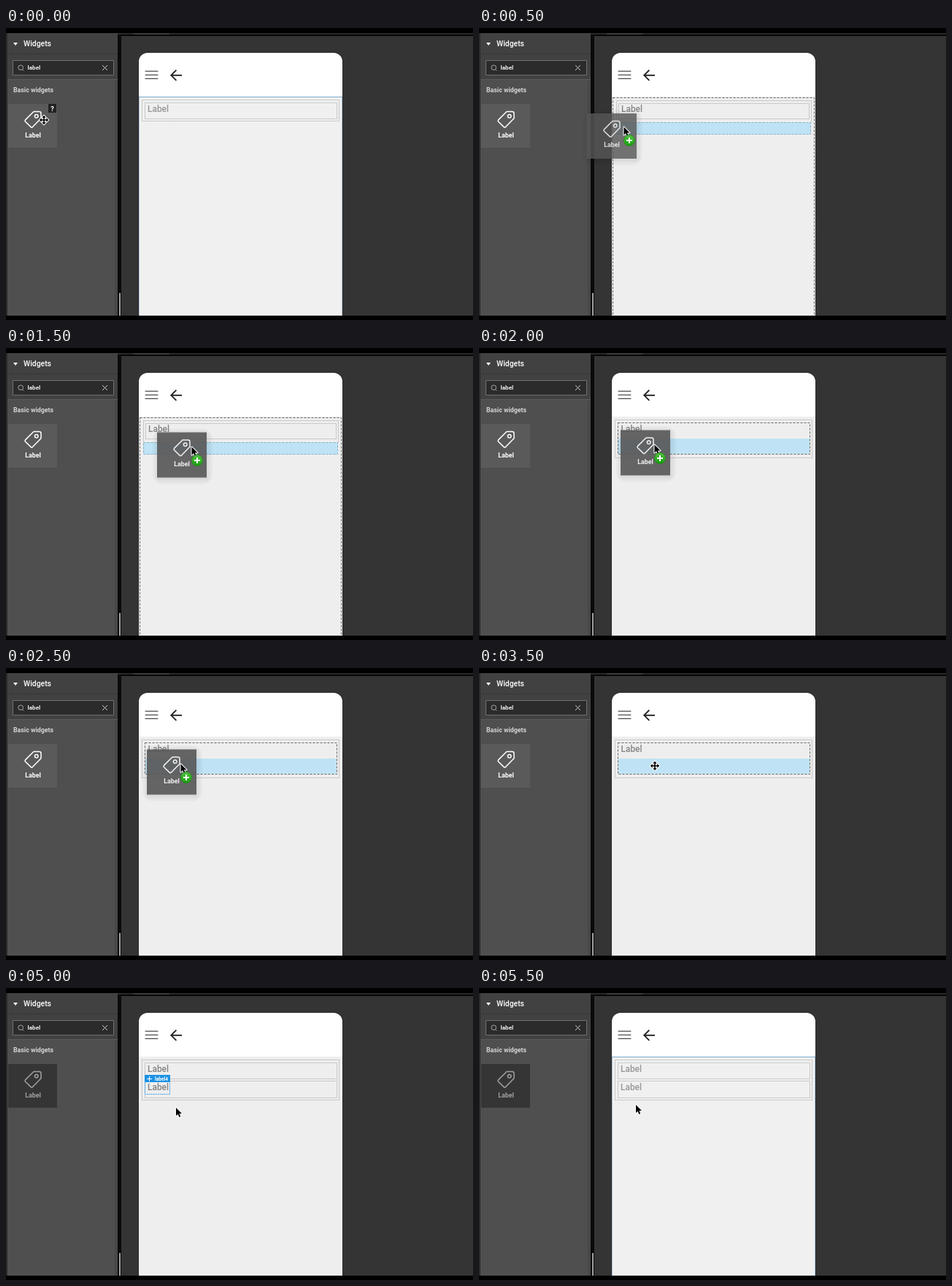
Write an HTML page with a canvas that moves like this. It is 640 px wide and 400 px high and loops after 6 s.

```html
<!DOCTYPE html>
<html lang="en">
<head>
<meta charset="utf-8">
<title>Dragging a label widget</title>
<style>
  html, body { margin: 0; width: 100%; height: 100%; overflow: hidden; background: #000; }
  canvas { display: block; width: 640px; height: 400px; }
</style>
</head>
<body>
<canvas id="stage" width="640" height="400"></canvas>
<script>
const ctx = document.getElementById('stage').getContext('2d');
const LOOP = 6000, STEP = 500;

// One pose per half second.
const steps = [
  { view: 'idle', move: [52, 126], tile: 'hover' },
  { view: 'below', ghost: [148, 117], tip: [198.5, 135.5], alpha: .8 },
  { view: 'below', ghost: [207, 115.5], tip: [254.5, 135.5] },
  { view: 'below', ghost: [207, 115.5], tip: [254.5, 135.5] },
  { view: 'inside', ghost: [194, 112.5], tip: [240.5, 132.5] },
  { view: 'inside', ghost: [193, 111.5], tip: [239.5, 131.5] },
  { view: 'inside', ghost: [193, 111.5], tip: [239.5, 131.5] },
  { view: 'inside', move: [241, 134] },
  { view: 'placed', tip: [240, 132], tile: 'dim', selected: true },
  { view: 'placed', tip: [238, 150.5], tile: 'dim', selected: true },
  { view: 'placed', tip: [233, 164], tile: 'dim', selected: true },
  { view: 'idle', tip: [215, 160], tile: 'dim', second: true }
];

function rect(x, y, w, h, color) {
  ctx.fillStyle = color;
  ctx.fillRect(x, y, w, h);
}

function line(points, color, width = 1) {
  ctx.beginPath();
  points.forEach(([x, y]) => ctx.lineTo(x, y));
  ctx.strokeStyle = color;
  ctx.lineWidth = width;
  ctx.stroke();
}

// Frame along pixel centres, from corner to corner.
function frame(x1, y1, x2, y2, color, dash = []) {
  ctx.setLineDash(dash);
  line([[x1 + .5, y1 + .5], [x2 + .5, y1 + .5], [x2 + .5, y2 + .5],
        [x1 + .5, y2 + .5], [x1 + .5, y1 + .5]], color);
  ctx.setLineDash([]);
}

const dotted = (x1, y1, x2, y2, color = '#a2a2a2') => frame(x1, y1, x2, y2, color, [1, 1]);
const dashed = (x1, y1, x2, y2, color = '#666') => frame(x1, y1, x2, y2, color, [3, 2]);

function text(str, x, y, size, color, weight = 500, align = 'left') {
  ctx.font = `${weight} ${size}px Roboto, sans-serif`;
  ctx.textAlign = align;
  ctx.fillStyle = color;
  ctx.fillText(str, x, y);
}

function tagIcon(x, y, color) {
  ctx.save();
  ctx.translate(x, y);
  ctx.lineJoin = 'round';
  ctx.strokeStyle = color;
  ctx.lineWidth = 1.5;
  ctx.beginPath();
  ctx.moveTo(13, 1.2);
  ctx.lineTo(20.5, 1.2);
  ctx.quadraticCurveTo(23, 1.2, 23, 3.7);
  ctx.lineTo(23, 10.5);
  ctx.lineTo(11.5, 22.3);
  ctx.quadraticCurveTo(10.3, 23.4, 9.1, 22.3);
  ctx.lineTo(1.5, 15);
  ctx.quadraticCurveTo(.4, 13.8, 1.5, 12.6);
  ctx.closePath();
  ctx.stroke();
  ctx.beginPath();
  ctx.arc(16.7, 7.5, 2.3, 0, Math.PI * 2);
  ctx.stroke();
  ctx.restore();
}

function tile(x, y, color) {
  tagIcon(x + 22, y + 9.3, color);
  text('Label', x + 34, y + 46.4, 8.9, color, 600, 'center');
}

function sidebar(state) {
  rect(0, 7, 153, 387, '#414141');
  rect(0, 35, 153, 1, '#363636');
  rect(2, 71, 151, 323, '#4f4f4f');
  rect(2, 70, 151, 1, '#5b5b5b');
  rect(149, 72, 4, 322, '#484848');
  rect(0, 7, 2, 387, '#2c2c2c');
  ctx.fillStyle = '#fff';
  ctx.beginPath();
  ctx.moveTo(10, 20);
  ctx.lineTo(16, 20);
  ctx.lineTo(13, 24);
  ctx.fill();
  text('Widgets', 24, 25, 10.4, '#fff');

  rect(9, 44, 139, 21, '#2b2b2b');
  frame(9, 44, 147, 64, '#707070');
  ctx.beginPath();
  ctx.arc(20.2, 54.2, 3.3, 0, Math.PI * 2);
  ctx.strokeStyle = '#aaa';
  ctx.lineWidth = 1;
  ctx.stroke();
  line([[22.5, 56.7], [24.2, 58.4]], '#aaa');
  text('label', 29.6, 57.3, 8.1, '#f2f2f2', 600);
  line([[132, 51], [139, 58]], '#ccc');
  line([[139, 51], [132, 58]], '#ccc');
  text('Basic widgets', 10, 88, 8.8, '#d4d4d4', 700);

  const dim = state === 'dim';
  rect(3, 104, 67, 60, dim ? '#353535' : '#5a5a5a');
  tile(3, 104, dim ? '#a0a0a0' : '#fff');
  if (state === 'hover') {
    rect(58, 104, 11, 12, '#222');
    text('?', 63.5, 113.5, 9, '#fff', 700, 'center');
  }
}

function phone(view) {
  rect(153, 7, 5, 387, '#0a0a0a');
  rect(158, 7, 482, 387, '#343434');
  rect(153, 7, 487, 2, '#282828');
  rect(175, 7, 49, 2, '#3c3c3c');
  rect(158, 9, 482, 2, '#060606');
  rect(155, 363, 2, 31, '#a0a0a0');
  ctx.fillStyle = '#fff';
  ctx.beginPath();
  ctx.roundRect(182, 34, 279, 370, [12, 12, 0, 0]);
  ctx.strokeStyle = '#2a2a2a';
  ctx.lineWidth = 2;
  ctx.stroke();
  ctx.fill();
  rect(182, 94, 279, 300, view === 'idle' ? '#f0f0f0' : '#eee');
  for (const y of [58.6, 63.7, 68.8]) rect(190.6, y, 17.8, 1.2, '#444');
  line([[241, 64.8], [226.5, 64.8]], '#222', 1.9);
  line([[233.4, 57.7], [226.3, 64.8], [233.4, 71.9]], '#222', 1.9);
}

function content({ view, selected, second }) {
  const grey = view === 'idle' ? '#979797' : '#848484';
  const label = (x, y) => text('Label', x, y, 11.9, grey, 500);
  if (view === 'below') {
    dashed(183, 95, 459, 400);
    dotted(188, 99, 455, 129);
    dotted(191, 103, 452, 124);
    rect(188, 129, 267, 17, '#bfe3f5');
    dashed(188, 129, 454, 145, '#8ab0c2');
    label(195, 115.3);
  } else if (view === 'inside') {
    dotted(186, 98, 456, 150);
    rect(191, 124, 262, 21, '#bfe3f5');
    dashed(190, 102, 453, 145);
    label(194.5, 114.5);
  } else {
    if (view === 'idle') {
      rect(182, 94, 279, 1, '#8db9d8');
      dotted(182, 94, 460, 400, '#6c9fc4');
    }
    const two = view === 'placed' || second;
    dotted(186, 98, 456, two ? 153 : 127);
    dotted(190, 102, 453, 124);
    label(194, 114.5);
    if (two) {
      dotted(190, 127, 453, 150);
      label(194, 140);
    }
  }
  if (selected) {
    frame(190, 128, 224, 145, '#3b9fe8', [2, 1]);
    rect(190, 119, 35, 10, '#1c92e6');
    line([[193, 124.5], [200, 124.5]], '#fff');
    line([[196.5, 121], [196.5, 128]], '#fff');
    text('label4', 204, 127, 6.6, '#fff', 700);
  }
}

function dragGhost([x, y], alpha = .9) {
  ctx.fillStyle = 'rgba(0,0,0,.03)';
  for (const spread of [7, 4, 1]) {
    ctx.beginPath();
    ctx.roundRect(x + 1 - spread, y + 2 - spread, 68 + 2 * spread, 62 + 2 * spread, 2 * spread);
    ctx.fill();
  }
  ctx.save();
  ctx.globalAlpha = alpha;
  rect(x, y, 68, 62, '#585858');
  tile(x, y, '#fff');
  ctx.restore();
}

function pointer([x, y]) {
  ctx.save();
  ctx.translate(x, y);
  ctx.scale(.92, .92);
  ctx.beginPath();
  for (const [px, py] of [[0, 0], [0, 12], [2.8, 9.4], [4.8, 14], [6.8, 13.1], [4.9, 8.7], [8.7, 8.7]])
    ctx.lineTo(px, py);
  ctx.closePath();
  ctx.lineJoin = 'round';
  ctx.strokeStyle = '#fff';
  ctx.lineWidth = 2.2;
  ctx.stroke();
  ctx.fillStyle = '#000';
  ctx.fill();
  ctx.restore();
}

function addBadge(x, y) {
  const shade = ctx.createLinearGradient(0, y - 8, 0, y + 8);
  shade.addColorStop(0, '#54c143');
  shade.addColorStop(1, '#169c0d');
  ctx.beginPath();
  ctx.arc(x, y, 7.6, 0, Math.PI * 2);
  ctx.fillStyle = shade;
  ctx.fill();
  ctx.strokeStyle = '#1f8a17';
  ctx.lineWidth = .8;
  ctx.stroke();
  rect(x - 4, y - 1, 8, 2, '#fff');
  rect(x - 1, y - 4, 2, 8, '#fff');
}

function moveCursor([x, y]) {
  ctx.save();
  ctx.translate(x, y);
  const arms = new Path2D();
  for (let i = 0; i < 4; i++) {
    const arm = new Path2D('M-.8 0V-3.3H-2.7L0 -6.2L2.7 -3.3H.8V0Z');
    arms.addPath(arm, new DOMMatrix().rotate(i * 90));
  }
  ctx.lineJoin = 'round';
  ctx.strokeStyle = '#fff';
  ctx.lineWidth = 2;
  ctx.stroke(arms);
  ctx.fillStyle = '#000';
  ctx.fill(arms);
  ctx.restore();
}

function draw(time) {
  const pose = steps[Math.floor((time % LOOP) / STEP)];
  rect(0, 0, 640, 400, '#000');
  ctx.save();
  ctx.beginPath();
  ctx.rect(0, 7, 640, 387);
  ctx.clip();
  sidebar(pose.tile);
  phone(pose.view);
  content(pose);
  if (pose.ghost) dragGhost(pose.ghost, pose.alpha);
  if (pose.move) moveCursor(pose.move);
  if (pose.tip) pointer(pose.tip);
  if (pose.ghost) addBadge(pose.tip[0] + 7.5, pose.tip[1] + 18.5);
  ctx.restore();
}

const start = performance.now();
function tick() {
  draw(performance.now() - start);
  requestAnimationFrame(tick);
}
tick();
</script>
</body>
</html>
```
